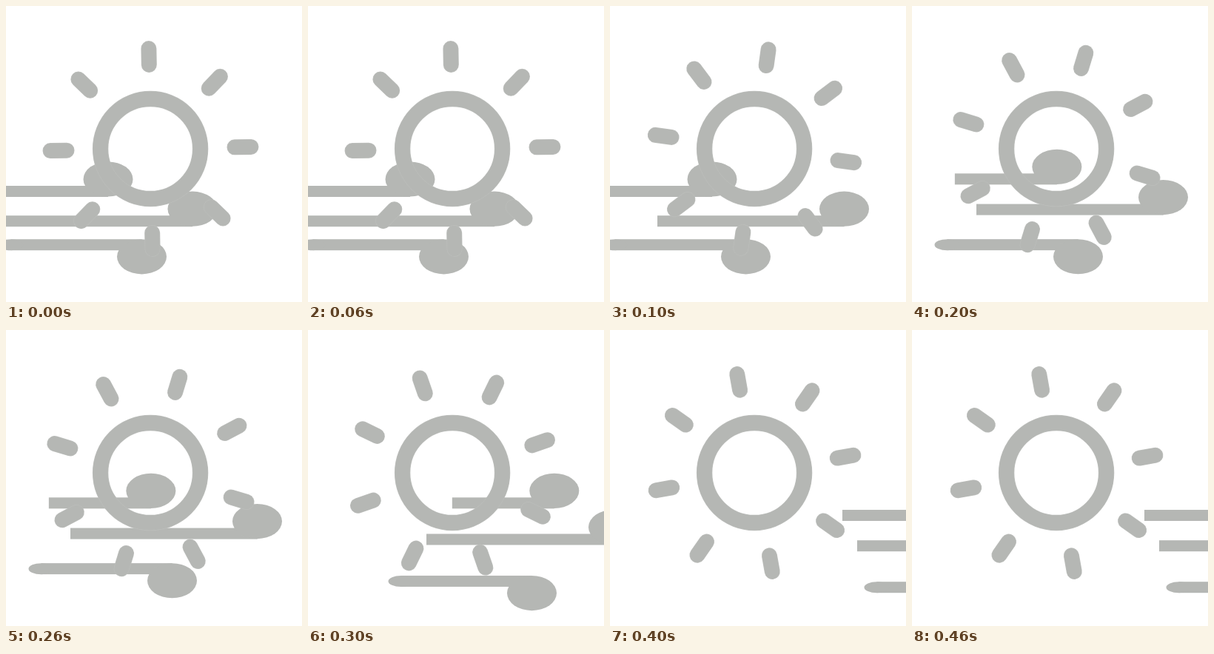
An HTML page that plays this animation: 400x400 px, repeating every 0.5 s.

```html
<!DOCTYPE html>
<html lang="en">
<head>
<meta charset="utf-8">
<title>Sun and wind</title>
<style>
  html, body { margin: 0; width: 100%; height: 100%; overflow: hidden; background: #fff; }
  svg { display: block; width: 100vw; height: 100vh; }
  .rim { stroke: #bcbebb; }
  .ink { stroke: #b5b7b4; }
</style>
</head>
<body>
<svg viewBox="0 0 400 400">
  <g id="wind" fill="#b5b7b4"></g>
  <g fill="none" stroke-linecap="round">
    <circle class="rim" cx="195.1" cy="193" r="67.5" stroke-width="21.4"/>
    <circle class="ink" cx="195.1" cy="193" r="67.5" stroke-width="20"/>
    <g id="rays"></g>
  </g>
</svg>
<script>
const LOOP = 500, STEP = 100, RAYS = 8;
const BAR = 15, HEAD = { rx: 33.5, ry: 23.6 };
const NS = "http://www.w3.org/2000/svg";
const wind = document.getElementById("wind");
const rays = document.getElementById("rays");

function add(parent, tag, attrs) {
  const el = document.createElementNS(NS, tag);
  for (const key in attrs) el.setAttribute(key, attrs[key]);
  return parent.appendChild(el);
}

for (let i = 0; i < RAYS; i++) {
  const transform = `rotate(${i * 360 / RAYS})`;
  const d = "M0 -135.5V-113.5";
  add(rays, "path", { class: "rim", d, transform, "stroke-width": 21 });
  add(rays, "path", { class: "ink", d, transform, "stroke-width": 19.6 });
}

// A gust slides level by `slide`, then its head follows a cubic curve (a, b, end) from `x, y`.
function gust({ x, y, tail, slide = 0, tip = 0, a, b, end }) {
  const el = add(wind, "g", {});
  const top = tip ? -HEAD.ry : HEAD.ry - BAR + 0.4;
  const left = tip - tail;
  add(el, "rect", { x: left, y: top, width: -left, height: BAR });
  if (tip) add(el, "ellipse", { cx: left, cy: top + BAR / 2, rx: tip, ry: BAR / 2 });
  add(el, "ellipse", HEAD);

  return beat => {
    const u = Math.max(0, beat - 1) / 3, v = 1 - u;
    const curve = k => 3 * v * v * u * a[k] + 3 * v * u * u * b[k] + u ** 3 * end[k];
    const dx = slide * Math.min(1, beat) + curve(0);
    el.setAttribute("transform", `translate(${x + dx} ${y + curve(1)})`);
  };
}

const gusts = [
  gust({ x: 138, y: 234, tail: 138, a: [-14, -25], b: [236, -25], end: [314, 0] }),
  gust({ x: 252, y: 274.2, tail: 252.5, slide: 64.5, a: [15, -35], b: [28.5, -0.5], end: [270, 1] }),
  gust({ x: 183.5, y: 338.8, tail: 194, tip: 17, a: [62.5, -17], b: [0.5, 29.5], end: [354, 25] })
];

function draw(time) {
  const beat = Math.floor((time % LOOP) / STEP);
  const turn = -1.1 + beat * STEP / LOOP * 360 / RAYS;
  rays.setAttribute("transform", `translate(195.5 193) rotate(${turn})`);
  gusts.forEach(move => move(beat));
}

let start;
function tick(now) {
  start ??= now;
  draw(Math.max(0, now - start));
  requestAnimationFrame(tick);
}

draw(0);
requestAnimationFrame(tick);
</script>
</body>
</html>
```
